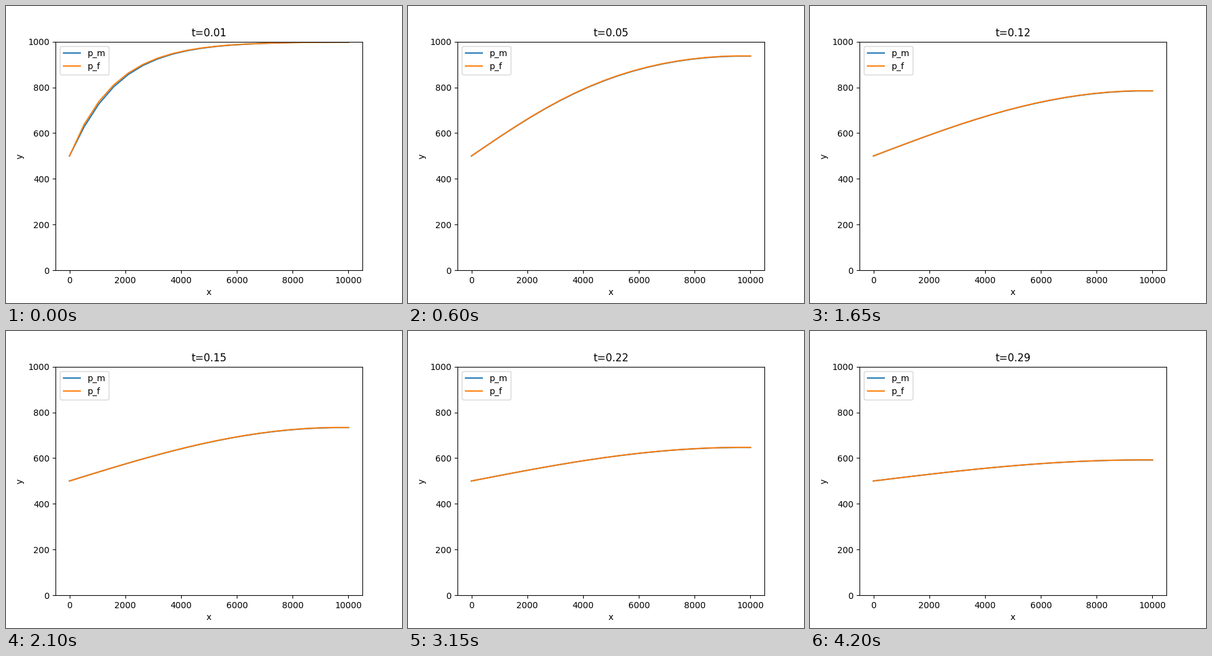
Write a matplotlib script that moves like this. It is 640x480 px and loops after 4350 ms.

```python
import numpy as np
import matplotlib.pyplot as plt
from matplotlib.animation import FuncAnimation

NODES = 20
STEPS = 29
DT = 0.01
P_START, P_LEFT = 1000.0, 500.0

# Per-step diffusion and exchange numbers of the two coupled media
DIFF_M, DIFF_F = 60.0, 9.05
EXCH_M, EXCH_F = 120.0, 1.2


def medium_rows(diff, exch, own, other):
    """Implicit rows for one medium: fixed left end, closed right end."""
    rows = np.zeros((NODES, 2 * NODES))
    rows[0, own] = 1
    for i in range(1, NODES - 1):
        rows[i, own + i - 1] = rows[i, own + i + 1] = -diff
        rows[i, own + i] = 1 + 2 * diff + exch
        rows[i, other + i] = -exch
    rows[-1, own + NODES - 1] = 1
    rows[-1, own + NODES - 2] = -1
    return rows


def simulate():
    system = np.vstack([medium_rows(DIFF_M, EXCH_M, 0, NODES),
                        medium_rows(DIFF_F, EXCH_F, NODES, 0)])
    p = np.full((2, NODES), P_START)
    history = []
    for _ in range(STEPS):
        rhs = p.copy()
        rhs[:, 0] = P_LEFT
        rhs[:, -1] = 0
        p = np.linalg.solve(system, rhs.ravel()).reshape(2, NODES)
        history.append(p)
    return history


x = np.linspace(0, 10000, NODES)
history = simulate()

fig, ax = plt.subplots(figsize=(6.4, 4.8), dpi=100)
line_m, = ax.plot(x, history[0][0], label="p_m")
line_f, = ax.plot(x, history[0][1], label="p_f")
ax.set_xlim(-500, 10500)
ax.set_ylim(0, 1000)
ax.set_xlabel("x")
ax.set_ylabel("y")
ax.legend(loc="upper left")
title = ax.set_title("")


def update(step):
    p_m, p_f = history[step]
    line_m.set_ydata(p_m)
    line_f.set_ydata(p_f)
    title.set_text(f"t={(step + 1) * DT:.2f}")
    return line_m, line_f, title


anim = FuncAnimation(fig, update, frames=STEPS, interval=150, repeat=True)
plt.show()
```
